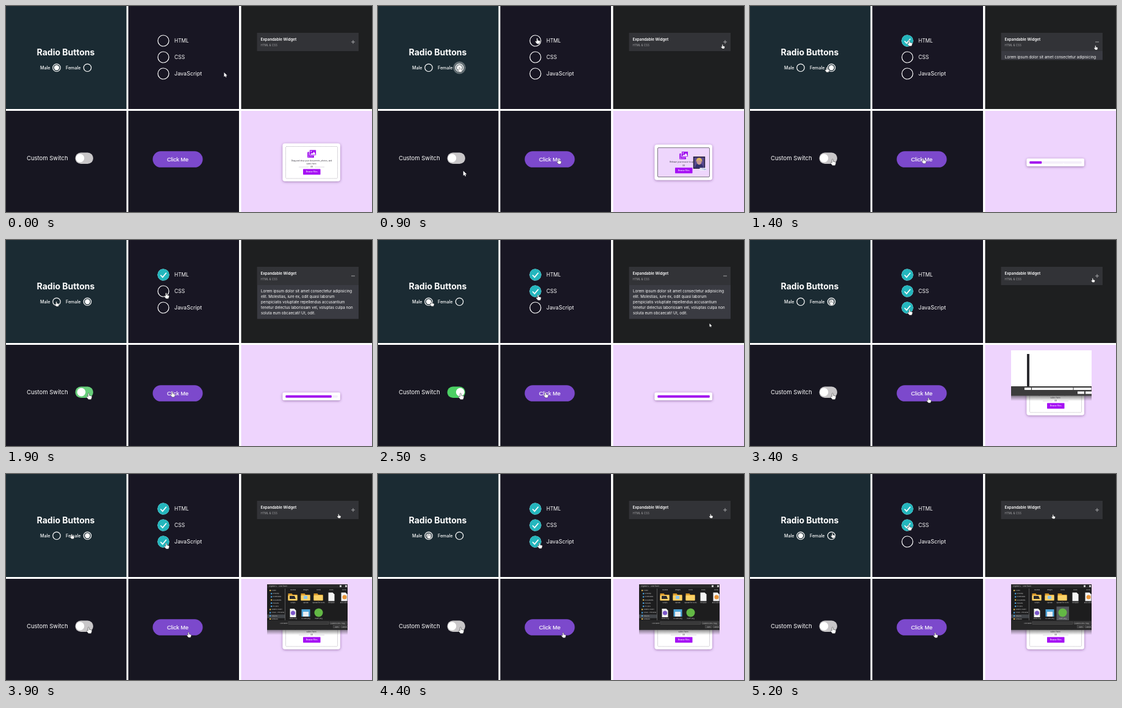
An HTML page that plays this animation: 600 by 338 pixels, repeating every 5300 ms.

```html
<!DOCTYPE html>
<html lang="en">
<head>
<meta charset="utf-8">
<title>UI widgets</title>
<style>
html, body { margin: 0; width: 100%; height: 100%; overflow: hidden; background: #fff; }
svg { display: block; width: 100vw; height: 100vh; }
text { font-family: Inter, "Open Sans", sans-serif; fill: #fff; }
.ring { fill: none; stroke: #fff; stroke-width: 1.2; }
.mid { text-anchor: middle; }
.ink text { fill: #33303a; }
.tiny text { font-size: 2.6px; fill: #c4c4c4; }
</style>
</head>
<body>
<svg viewBox="0 0 600 338" xmlns="http://www.w3.org/2000/svg">
  <defs>
    <filter id="shade" x="-20%" y="-40%" width="140%" height="180%">
      <feDropShadow dx="0" dy="1" stdDeviation="2.2" flood-color="#3b1d52" flood-opacity=".45"/>
    </filter>
    <linearGradient id="fade" x2="0" y2="1">
      <stop stop-color="#222" stop-opacity=".55"/>
      <stop offset="1" stop-color="#222" stop-opacity="0"/>
    </linearGradient>
    <clipPath id="fold"><rect id="foldBox" x="411.5" y="74" width="166.5" height="0"/></clipPath>
    <clipPath id="win"><rect x="428" y="181" width="132" height="74.5"/></clipPath>
    <path id="hand" d="M-2-4a1 1 0 0 1 1.9 0v2.7l3.2.8a1.1 1.1 0 0 1 .9 1.3l-.6 2.3-.8 1.7h-3.8l-2.7-3.2a.9.9 0 0 1 1.3-1.3l.6.5z" fill="#fff" stroke="#222" stroke-width=".45" stroke-linejoin="round"/>
    <path id="arrow" d="M-2-4v7.2l1.7-1.5 1.1 2.4 1.2-.5-1.1-2.4h2.3z" fill="#fff"/>
    <g id="folder">
      <path d="M-8-5.5h6l1.5 2h7.500v9.500h-15z" fill="#d99a2b"/>
      <rect x="-8" y="-2.500" width="15" height="8.500" rx=".7" fill="#fbd268"/>
    </g>
    <path id="sheet" d="M-5-7h7l3 3v11h-10z" fill="#f3f3f3"/>
    <g id="pic">
      <rect x="494" y="239.500" width="11" height="9.500" rx="1.200" fill="#a012ee"/>
      <path d="M495.700 241v7M495 247.700h8" stroke="#fff" stroke-width=".8" stroke-dasharray="1 1.100"/>
      <rect x="497.500" y="235.900" width="11" height="9.200" rx="1.200" fill="#a012ee" stroke="#fff" stroke-width=".7"/>
      <circle cx="500.300" cy="238.600" r=".9" fill="#fff"/>
      <path d="M499 243.700l2.300-2.600 1.200 1.200 2.400-3.300 2.600 4.700z" fill="#fff"/>
    </g>
    <g id="browse">
      <rect x="487" y="267.500" width="28.500" height="9.200" rx=".6" fill="#a510f4"/>
      <text class="mid" x="501.200" y="273.300" font-size="3.100" font-weight="500" style="fill:#fff">Browse Files</text>
    </g>
  </defs>

  <rect width="600" height="338" fill="#fff"/>
  <rect width="197.500" height="169" fill="#1b2b33"/>
  <rect x="200.500" width="181.500" height="169" fill="#181623"/>
  <rect x="385.500" width="214.500" height="169" fill="#1e1f20"/>
  <rect y="172" width="197.500" height="166" fill="#171621"/>
  <rect x="200.500" y="172" width="181.500" height="166" fill="#171621"/>
  <rect x="385.500" y="172" width="214.500" height="166" fill="#eed4fd"/>

  <text class="mid" x="98" y="81" font-size="14" font-weight="700">Radio Buttons</text>
  <g font-size="7.100" font-weight="500">
    <text x="56" y="104.200">Male</text>
    <text x="98" y="104.200">Female</text>
  </g>
  <g id="radios"></g>

  <g id="checks"></g>
  <text x="276" y="59.800" font-size="8.300">HTML</text>
  <text x="276" y="87" font-size="8.600">CSS</text>
  <text x="276" y="114.300" font-size="9">JavaScript</text>

  <rect x="411.500" y="44" width="166.500" height="30" fill="#323337"/>
  <text x="417.500" y="57" font-size="6.250" font-weight="600">Expandable Widget</text>
  <text x="417.500" y="65.800" font-size="4.500" style="fill:#a5a5a8">HTML &amp; CSS</text>
  <path d="M566 59h6" stroke="#c8c8ca" stroke-width=".75"/>
  <path id="plus" d="M569 56v6" stroke="#c8c8ca" stroke-width=".75"/>
  <g clip-path="url(#fold)">
    <rect x="411.500" y="74" width="166.500" height="56" fill="#3a3b42"/>
    <g id="lorem" font-size="6.200"></g>
  </g>

  <text x="34" y="252.800" font-size="9.500">Custom Switch</text>
  <rect id="track" x="113.500" y="240.500" width="29.500" height="18.500" rx="9.250"/>
  <circle id="knob" cy="249.700" r="6.900" fill="#fff"/>

  <rect x="240.500" y="238.300" width="82" height="26.500" rx="13.250" fill="#7c49cc"/>
  <text class="mid" x="281.500" y="254.500" font-size="9.200" style="font-family:'Liberation Sans',Arial,sans-serif" stroke="#fff" stroke-width=".15">Click Me</text>

  <g id="idle" class="ink">
    <rect x="453.500" y="225.500" width="94.500" height="62" rx="4" fill="#fff" filter="url(#shade)"/>
    <rect x="458.500" y="230.500" width="85" height="52.500" rx="1.500" fill="#fff" stroke="#8d8794" stroke-width=".5" stroke-dasharray="1.200 .6"/>
    <use href="#pic"/>
    <g class="mid" font-size="3.200">
      <text x="501" y="254.700">Drag and drop your documents, photos, and</text>
      <text x="501" y="259.500">video here.</text>
      <text x="501" y="265.200" font-size="2.800">OR</text>
    </g>
    <path d="M480 264.200h16M506 264.200h16" stroke="#bbb5c2" stroke-width=".5"/>
    <use href="#browse"/>
  </g>

  <g id="over" class="ink">
    <rect x="453.500" y="227.500" width="94.500" height="58" rx="4" fill="#fff" filter="url(#shade)"/>
    <rect x="458.500" y="232.500" width="85" height="48" rx="1.500" fill="#eed6fc" stroke="#4b4452" stroke-width=".7"/>
    <use href="#pic" y="2.500"/>
    <g class="mid" font-size="3.200">
      <text x="501" y="257">Release your mouse to upload</text>
      <text x="501" y="262.700" font-size="2.800">OR</text>
    </g>
    <use href="#browse" y="-2.300"/>
  </g>

  <g id="load">
    <rect x="453.500" y="250.300" width="94.500" height="12.700" rx="2.500" fill="#fff" filter="url(#shade)"/>
    <rect x="458.300" y="254.700" width="85.500" height="4" rx="1.200" fill="#f4effa"/>
    <rect id="bar" x="458.300" y="254.700" height="4" rx="1.200" fill="#a210ef"/>
  </g>

  <g id="drag">
    <rect x="-9.700" y="-10" width="19.400" height="20" fill="#241f38"/>
    <rect x="-8.200" y="-8.500" width="16.400" height="17" fill="#5a4a92"/>
    <path d="M-7 8.500q1-7 7-7t7 7z" fill="#33306c"/>
    <ellipse cx="0" cy="-1.500" rx="4" ry="5" fill="#c69a92"/>
    <path d="M-5-1q0-7 5-7t5 7l-2-3h-6z" fill="#dfb95c"/>
    <rect x="1" y="8.500" width="10.500" height="4.500" fill="#f4f7fc" opacity=".95"/>
    <text x="2" y="11.900" font-size="2.800" style="fill:#3d63b4">+ Copy</text>
  </g>

  <g id="dialog">
    <rect x="428" y="255" width="132" height="9" fill="url(#fade)"/>
    <g id="blank">
      <rect x="428" y="181" width="132" height="59" fill="#fff"/>
      <rect x="428" y="240" width="132" height="15.500" fill="#3c3c3c"/>
      <rect x="454" y="187" width="4" height="53" fill="#2b2b2f"/>
      <path d="M450 242.200h10.800v3.800h-10.800zM462 242.200h67.500v3.800h-67.500zM530.500 242.200h29v3.800h-29zM537 248.500h11v4h-11zM550 248.500h10v4h-10z" fill="#fff"/>
    </g>
    <g id="files" class="tiny" clip-path="url(#win)">
      <rect x="428" y="181" width="132" height="75" fill="#1d1d1e"/>
      <rect x="428" y="181" width="132" height="6" fill="#29292a"/>
      <text x="431" y="185">Organize ▾</text>
      <text x="447.500" y="185">New folder</text>
      <path d="M547 182.500h3v3h-3zM556 182.500h3v3h-3z" fill="#d8d8d8"/>
      <rect x="428" y="230.500" width="29" height="6" fill="#43464a"/>
      <g id="tree"></g>
      <rect x="457" y="188" width=".8" height="52" fill="#6b6b6b"/>
      <rect id="pick" x="502.500" y="217.500" width="20.500" height="22.500" fill="#55585c"/>
      <g id="icons" class="mid"></g>
      <rect x="428" y="240" width="132" height="16" fill="#272728"/>
      <text x="449.500" y="245.600">File name:</text>
      <g fill="#363637" stroke="#777" stroke-width=".35">
        <rect x="463" y="242.500" width="66" height="4.200"/>
        <rect x="531" y="242.500" width="28" height="4.200"/>
        <rect x="536.500" y="248.500" width="11" height="4.200"/>
        <rect x="549.500" y="248.500" width="11" height="4.200"/>
      </g>
      <text x="532" y="245.600">Custom Files (*.jpg)</text>
      <text x="538.700" y="251.600">Open</text>
      <text x="550.500" y="251.600">Cancel</text>
    </g>
  </g>
  <g id="cursors"></g>
</svg>
<script>
const LOOP = 5300, STEP = 100;
const $ = id => document.getElementById(id);
const set = (el, attrs) => { for (const k in attrs) el.setAttribute(k, attrs[k]); };
const show = (el, on) => set(el, { visibility: on ? 'visible' : 'hidden' });
const clamp = v => Math.max(0, Math.min(1, v));
const ease = p => p * p * (3 - 2 * p);
const ramp = (t, from, len) => clamp((t - from) / len);

// Eased position along [time, x, y] keys
function along(keys, t) {
  let i = 0;
  while (i < keys.length - 2 && t >= keys[i + 1][0]) i++;
  const [a, b] = [keys[i], keys[i + 1]];
  const p = ease(ramp(t, a[0], b[0] - a[0]));
  return [a[1] + (b[1] - a[1]) * p, a[2] + (b[2] - a[2]) * p];
}

// Widget state: the last click at or before t decides
const RADIO = [[-1000, 0], [700, 1], [2100, 0], [3300, 1], [4300, 0]];
const radioX = [83, 133.5], checkY = [57, 84, 111];
const checkOn = [[1200, LOOP], [2200, LOOP], [3200, 4600]];

$('radios').innerHTML = radioX.map(x =>
  `<circle cx="${x}" cy="101.3" fill="#fff"/><circle cx="${x}" cy="101.3" fill="#fff"/>
   <circle class="ring" cx="${x}" cy="101.3" r="6.2"/>`).join('');
$('checks').innerHTML = checkY.map(y =>
  `<circle class="ring" cx="258" cy="${y}" r="9"/>
   <g><circle cx="258" cy="${y}" r="9.600" fill="#24b6bd"/>
   <path d="M253.300 ${y + .5}l3.400 3.600 6.200-7.400" fill="none" stroke="#fff" stroke-width="1.700"/></g>`).join('');
$('lorem').innerHTML = [
  'Lorem ipsum dolor sit amet consectetur adipisicing',
  'elit. Molestias, iure ex, odit quasi laborum',
  'perspiciatis voluptate repellendus accusantium',
  'tenetur delectus laboriosam vel, voluptas culpa non',
  'soluta eum obcaecati! Ut, odit.'
].map((s, i) => `<text x="418" y="${86.3 + i * 8.85}">${s}</text>`).join('');
$('tree').innerHTML = ['Home', 'Desktop', 'Downloads', 'Documents', 'Pictures', 'PC pics',
  'Shared Folder', 'Cloud - Personal', 'This PC', 'Network'
].map((s, i) => {
  const y = 192 + i * 5.2, x = i && i < 6 ? 434 : 432;
  return `<rect x="${x}" y="${y - 2}" width="2.200" height="2.200" fill="${i % 3 ? '#4aa3df' : '#d9b04a'}"/>
    <text x="${x + 3.5}" y="${y}">${s}</text>`;
}).join('');

const label = (x, y, s) => `<text x="${x}" y="${y}">${s}</text>`;
const cols = [470.5, 491.5, 512.5, 533.5, 554.5];
$('icons').innerHTML =
  cols.map((x, i) => label(x, 191, ['Sounds', 'Images', 'Fonts', 'Docs', 'Icons'][i])
    + `<use href="#${i < 3 ? 'folder' : 'sheet'}" x="${x}" y="201.500"/>`
    + label(x, 212.3, ['scripts', 'upload', 'upload file icons', 'template', 'add-button'][i])).join('')
  + `<path d="M465 200h8l2 5h-10z" fill="#29292b"/><rect x="488" y="200" width="6" height="5" fill="#8ec5ea"/>
     <circle cx="555" cy="202" r="3.500" fill="#e8943a"/>
     <use href="#sheet" x="470.500" y="228"/><circle cx="470.500" cy="228" r="3.600" fill="#7b57c9"/>
     <rect x="484.500" y="222" width="14" height="12" fill="#4fa5d8"/><rect x="487" y="226" width="9" height="8" fill="#e9eef2"/>
     <circle cx="512.500" cy="227.500" r="7" fill="#63b845"/>`
  + ['cards.svg', 'ui-card.png', 'insert.png'].map((s, i) => label(cols[i], 238.4, s)).join('');

// Pointers: keys, size, visible spans, test for the hand shape
const pointers = [
  { size: .85, spans: [[100, LOOP]], hand: (x, y) => y < 111,
    keys: [[100, 188, 150], [600, 134.5, 104.5], [1300, 134.5, 104.5], [1700, 83.5, 105], [2400, 83.5, 105],
      [2900, 133.5, 103], [3600, 133.5, 103], [4200, 83.5, 102], [4700, 83.5, 102], [5200, 136, 101]] },
  { size: 1, spans: [[0, LOOP]], hand: x => x < 322,
    keys: [[0, 359.5, 113], [700, 262, 57.5], [1300, 262, 57.5], [1800, 263.5, 91.5], [2400, 263.5, 91.5],
      [2900, 262.5, 118.5], [3600, 262.5, 118.5], [4300, 265.5, 117.5], [4700, 265.5, 117.5], [5200, 261.5, 88]] },
  { size: .75, spans: [[100, 1800], [2500, LOOP]], hand: (x, y) => y < 75,
    keys: [[100, 556, 150], [700, 565.5, 66.5], [1300, 565.5, 66.5], [1800, 581, 84], [2500, 545, 140],
      [2900, 562.5, 66], [3400, 562.5, 66], [3700, 546, 69], [4400, 546, 69], [5200, 497.5, 70]] },
  { size: 1.1, spans: [[700, LOOP]], hand: (x, y) => y < 262,
    keys: [[700, 147, 284], [900, 142, 275], [1300, 136.5, 256.5], [LOOP, 136.5, 256.5]] },
  { size: .9, spans: [[100, LOOP]], hand: (x, y) => y < 267,
    keys: [[100, 322, 270], [600, 297, 255], [1100, 297, 255], [1700, 273.5, 253.5], [2400, 273.5, 253.5],
      [2900, 293.5, 263], [3500, 293.5, 263], [4200, 304.5, 264.5], [LOOP, 304.5, 264.5]] },
  { size: .45, spans: [[1300, 3400]], hand: (x, y) => y > 268,
    keys: [[1300, 513, 259], [1800, 526, 260.5], [2500, 526, 260.5], [2900, 504, 275.5], [LOOP, 504, 275.5]] }
];
pointers.forEach(p => {
  p.el = document.createElementNS('http://www.w3.org/2000/svg', 'use');
  $('cursors').append(p.el);
});

function drawRadios(t) {
  const [start, chosen] = RADIO.filter(r => r[0] <= t).pop();
  const age = t - start;
  radioX.forEach((x, i) => {
    const [wave, dot] = [0, 1].map(k => $('radios').children[i * 3 + k]);
    const on = i === chosen;
    set(dot, { r: on ? 4.2 * (.75 + .25 * ramp(age, 0, 200)) : 0, 'fill-opacity': on && age < 200 ? .85 : 1 });
    set(wave, { r: on && age < 400 ? 10.3 * ramp(age, 0, 200) : 0, opacity: .32 * (1 - ramp(age, 200, 200)) });
  });
}

function drawUpload(t) {
  const over = t >= 700 && t < 1200, load = t >= 1200 && t < 2600;
  show($('idle'), !over && !load);
  show($('over'), over);
  show($('load'), load);
  set($('bar'), { width: 85.5 * ramp(t, 1220, 770) });
  const [x, y] = along([[500, 556, 261], [900, 526.5, 257], [1200, 513, 256]], t);
  set($('drag'), { transform: `translate(${x} ${y})` });
  show($('drag'), t >= 500 && t < 1200);
  $('dialog').style.display = t >= 3400 ? '' : 'none';
  show($('blank'), t < 3600);
  $('files').style.display = t >= 3600 ? '' : 'none';
  $('pick').style.display = t >= 5000 ? '' : 'none';
}

function draw(t) {
  drawRadios(t);
  checkOn.forEach(([a, b], i) => show($('checks').children[i * 2 + 1], t >= a && t < b));

  const open = ease(ramp(t, 1300, 300)) - ease(ramp(t, 3100, 300));
  set($('foldBox'), { height: 55.5 * open });
  show($('plus'), t < 1300 || t >= 3100);

  const slide = ease(ramp(t, 1800, 400)) - ease(ramp(t, 3100, 300));
  const tint = clamp(slide * 5);
  const mix = (a, b) => Math.round(a + (b - a) * tint);
  set($('knob'), { cx: 121.4 + 13.4 * slide });
  set($('track'), { fill: `rgb(${mix(200, 76)},${mix(198, 208)},${mix(200, 100)})` });

  drawUpload(t);
  pointers.forEach(({ el, keys, size, spans, hand }) => {
    const [x, y] = along(keys, t);
    set(el, { href: hand(x, y) ? '#hand' : '#arrow', transform: `translate(${x} ${y}) scale(${size})` });
    show(el, spans.some(([a, b]) => t >= a && t < b));
  });
}

const begin = performance.now();
function tick() {
  const t = (performance.now() - begin) % LOOP;
  draw(Math.floor(t / STEP) * STEP);
  requestAnimationFrame(tick);
}
tick();
</script>
</body>
</html>
```
